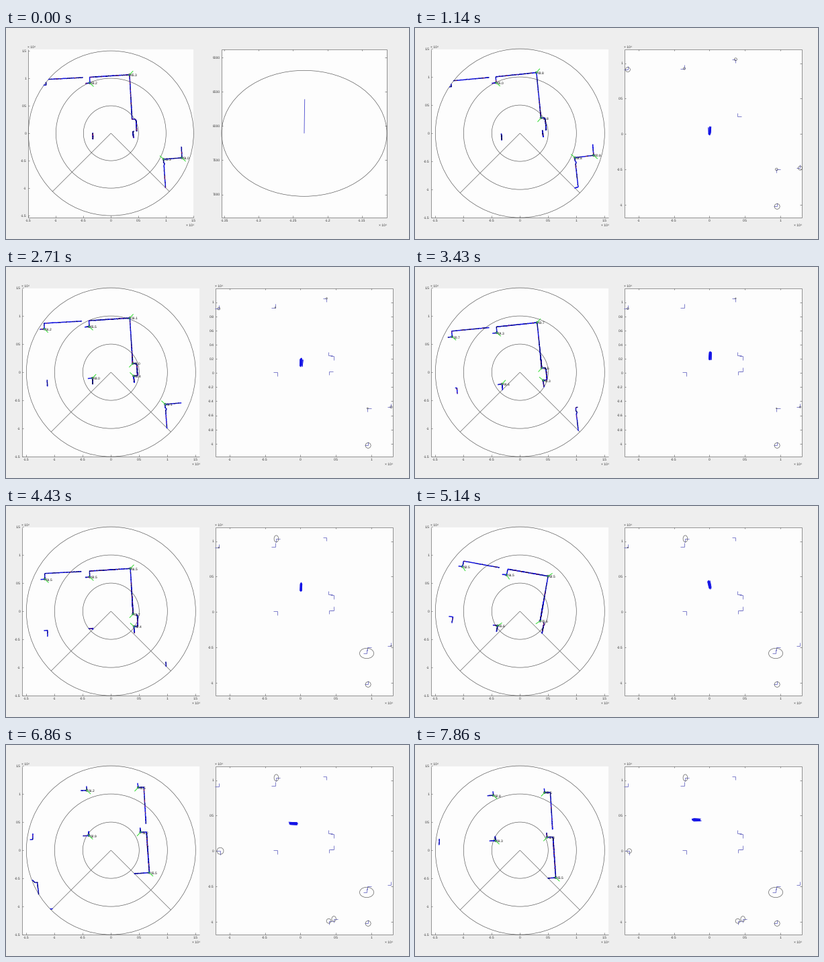
A matplotlib script that plays this animation: 600x315 px, repeating every 8000 ms.

```python
import numpy as np
import matplotlib.pyplot as plt
from matplotlib.animation import FuncAnimation
from matplotlib.patches import Ellipse, Rectangle

plt.rcParams["text.hinting"] = "none"
plt.rcParams["text.hinting_factor"] = 1

W, H, DPI, FRAMES = 600, 315, 100, 56
PX = 72 / DPI
FONT = ["Liberation Sans", "DejaVu Sans"]
INK = "#6a6a6a"
BLUE = "#1414e0"
RANGE = 15
FAN = np.radians(np.arange(-45, 225.01, .25))
ARMS = {"L": (-1, 0), "R": (1, 0), "U": (0, 1), "D": (0, -1)}

# Corners in metres: x, y, arm directions, step at which they enter the map.
NICHES = [(-3.54, 9.25, "LU", -1), (-11.5, 9.1, "LU", -1),
          (-3.25, .1, "LD", 11), (-11.3, 0, "LD", 41)]
BENDS = [(3.7, 10.55, "LD", -1), (3.95, 2.45, "UR", 1), (4.05, .22, "RD", 11),
         (9.47, -5, "RD", -1), (12.8, -4.82, "LU", -1)]
INNER = [(4.72, 2.35, "LD", 13), (4.72, .25, "LU", 20)]
# Corners seen only briefly keep their ellipse: two radii in pixels follow.
LOOSE = [(9.55, -10.25, "LU", -1, 4, 4), (-3.4, 10.35, "RD", 28, 3.3, 5),
         (9.35, -5.85, "LU", 29, 10.5, 7.7), (4.72, -9.6, "RD", 38, 3.2, 4),
         (4.0, -9.9, "RD", 45, 3.4, 3.4)]

TOP, DOOR, STEP, PILLAR, FAR = [b[:2] for b in BENDS]
WALLS = [
    [(-11.8, 10.1), (-3.6, 10.3), TOP, DOOR, (4.55, 2.42), (4.7, 2.1),
     (4.72, .27), STEP, (4.1, -.92)],
    [(12.75, -1.2), FAR, PILLAR, (9.45, -5.6), (9.65, -5.8), (9.5, -6.15),
     (9.68, -10.25), (9.0, -10.4)],
    [(4.3, -10.2), (4.75, -9.8), (4.75, -9.35), (7.9, -9.1)],
    [(-3.9, -9.85), (-2.9, -9.9), (-2.9, -10.6)],
]
for nx, ny, arms, _ in NICHES:
    WALLS.append([(nx - .75, ny - .05), (nx, ny),
                  (nx, ny + 1.05 * ARMS[arms[1]][1])])
SEG_A = np.array([p for w in WALLS for p in w[:-1]])
SEG_E = np.array([p for w in WALLS for p in w[1:]]) - SEG_A

fig = plt.figure(figsize=(W / DPI, H / DPI), dpi=DPI, facecolor="#eeeeee")
ax = fig.add_axes([0, 0, 1, 1])


def cross(p, q):
    return p[..., 0] * q[..., 1] - p[..., 1] * q[..., 0]


def rotate(p, a):
    p = np.asarray(p, float)
    c, s = np.cos(a), np.sin(a)
    return np.stack([p[..., 0] * c - p[..., 1] * s,
                     p[..., 0] * s + p[..., 1] * c], -1)


def pose(i):
    """Drive up with a slight sway, turn left, then drive left."""
    u = np.clip((i - 33) / 8, 0, 1)
    bend = u * u * (3 - 2 * u)
    after = max(i - 41, 0)
    x = .05 + .3 * bend - .125 * after
    y = .157 * np.clip(i - 11.5, 0, 21.8) + .068 * after
    sway = 2.8 - 1.25 * np.cos(np.pi * i / 8)
    return np.array([x, y]), np.radians(sway * (1 - bend) - 88 * bend)


def scan(pos, turn, rng):
    """Nearest wall hit of every ray, in the robot's own frame."""
    a = FAN - turn
    d = np.stack([np.cos(a), np.sin(a)], -1)[:, None, :]
    off, e = (SEG_A - pos)[None], SEG_E[None]
    den = cross(d, e)
    den = np.where(np.abs(den) < 1e-9, 1e-9, den)
    r, u = cross(off, e) / den, cross(off, d) / den
    r = np.where((r > 0) & (u >= 0) & (u <= 1), r, np.inf).min(axis=1)
    ok = r < RANGE
    r = r[ok] + rng.normal(0, .02, ok.sum())
    return np.stack([r * np.cos(FAN[ok]), r * np.sin(FAN[ok])], -1)


def line(p, q, color=INK, width=.7, z=2):
    ax.plot([p[0], q[0]], [p[1], q[1]], color=color, lw=width * PX, zorder=z,
            solid_capstyle="butt")


def oval(c, rx, ry, color="#555555"):
    ax.add_patch(Ellipse(c, 2 * rx, 2 * ry, fill=False, ec=color,
                         lw=.65 * PX, zorder=3))


def text(x, y, s, ha="center", color="#333333"):
    ax.text(x, y, s, ha=ha, va="center_baseline", family=FONT, color=color,
            fontsize=5.2 * PX, zorder=8)


def ticks(origin, step, lo, hi, gap):
    values = np.round(np.arange(lo, hi + gap / 2, gap), 2) + 0.0
    return [(origin + step * v, v) for v in values]


def panel(x0, x1, xt, yt, boxed, scaled=True):
    """White plot area; xt and yt hold (pixel, value) pairs."""
    y0, y1 = 31.5, 282.5
    ax.add_patch(Rectangle((x0, y0), x1 - x0, y1 - y0, fc="#fdfdfd",
                           ec="none", zorder=0))
    line((x0, y0), (x0, y1))
    line((x0, y1), (x1, y1))
    if boxed:
        line((x0, y0), (x1, y0))
        line((x1, y0), (x1, y1))
    for p, v in xt:
        line((p, y1), (p, y1 - 2.5))
        if boxed:
            line((p, y0), (p, y0 + 2.5))
        text(p, y1 + 5, f"{v:g}")
    for p, v in yt:
        line((x0, p), (x0 + 2.5, p))
        if boxed:
            line((x1, p), (x1 - 2.5, p))
        text(x0 - 2, p, f"{v:g}", "right")
    text(x1 - 5, y1 + 12, "× 10⁴")
    if scaled:
        text(x0 + 6, y0 - 3, "× 10⁴")


def draw_scan(i, pos, turn, rng):
    k = 8.2 if i == 0 else 8.4
    mid = np.array([156.3, 157.1])

    def px(p):
        return mid + np.asarray(p) * [k, -k]

    x0, x1 = (32.5, 279) if i == 0 else (23.5, 288)
    panel(x0, x1, ticks(mid[0], 10 * k, -1.5, 1.5, .5),
          ticks(mid[1], -10 * k, -1.5, 1.5, .5), False)
    for r in (5, 10, 15):
        oval(mid, r * k, r * k)
    for s in (-1, 1):
        line(mid, px((s * 10.607, -10.607)))

    hits = scan(pos, turn, rng)
    jumps = np.hypot(*np.diff(hits, axis=0).T) > .5
    trace = px(np.insert(hits, np.flatnonzero(jumps) + 1, np.nan, axis=0))
    for color, share, width in ((BLUE, 1, 1.5), ("#101030", .5, .8),
                                ("#c02030", .2, .8)):
        bits = trace.copy()
        bits[rng.random(len(bits)) > share] = np.nan
        ax.plot(*bits.T, color=color, lw=width * PX, zorder=4)

    for n, (x, y, arms, start) in enumerate(NICHES + BENDS):
        c = np.array([x, y])
        dirs = np.array([ARMS[a] for a in arms])
        probe = rotate(c + .6 * dirs - pos, turn)
        gap = np.hypot(*(hits[:, None] - probe[None]).transpose(2, 0, 1))
        if i <= start or (gap.min(axis=0) > .22).any():
            continue
        p = px(rotate(c - pos, turn))
        out = rotate(-dirs.sum(axis=0), turn) * [1, -1]
        line(p - 1.5 * out, p + 5.5 * out, "#30dc30", 1, 6)
        oval(p, 1.5, 1.5, "#202020")
        angle = 93.2 + 2.5 * np.sin(2.1 * n + i / 9)
        text(p[0] + 2, p[1] + .5, f"{angle:.1f}", "left", "#111111")


def draw_first_mark():
    c = np.array([444, 157.3])
    panel(320.5, 566.5, ticks(1706.2, 1023, -1.35, -1.15, .05),
          ticks(964.7, -.1023, 7000, 9000, 500), True, False)
    oval(c, 123, 94)
    line(c, c + [.7, -51], "#5050d0", .9)


def draw_map(i, pos, turn, rng):
    k = 10.56

    def px(p):
        return np.array([438.3, 158.2]) + np.asarray(p) * [k, -k]

    gap = .2 if 12 <= i < 28 else .5
    panel(311.5, 575.5, ticks(438.3, 10 * k, -1, 1, .5),
          ticks(158.2, -10 * k, -1, 1, gap), True)
    for x, y, arms, start, *radii in NICHES + BENDS + INNER + LOOSE:
        if i < start:
            continue
        c = np.array([x, y])
        for a in arms:
            line(px(c), px(c + .52 * np.array(ARMS[a])), "#6464c0", .8)
        if not radii:
            # Far corners start vague and sharpen with age.
            dist = np.hypot(*(c - pose(start)[0]))
            vague = .05 if start > 30 else .025
            radii = [vague * dist**2 * np.exp(-(i - start) / 18)] * 2
        if radii[0] > .7:
            oval(px(c), *radii)

    # Particle cloud: every guess is a short heading line.
    for _ in range(28):
        p = pos + rng.normal(0, .08, 2)
        a = np.pi / 2 - turn + rng.normal(0, .04)
        d = np.array([np.cos(a), np.sin(a)])
        line(px(p - .05 * d), px(p + .95 * d), "#1414e6", .8, 5)


def draw(i):
    ax.clear()
    ax.set(xlim=(0, W), ylim=(H, 0))
    ax.axis("off")
    rng = np.random.default_rng(100 + i)
    pos, turn = pose(i)
    draw_scan(i, pos, turn, rng)
    if i == 0:
        draw_first_mark()
    else:
        draw_map(i, pos, turn, rng)
    line((0, H - .5), (W, H - .5), "#303030", 1)
    return []


anim = FuncAnimation(fig, draw, frames=FRAMES, init_func=lambda: [],
                     interval=8000 / FRAMES, repeat=True, repeat_delay=0)
plt.show()
```
